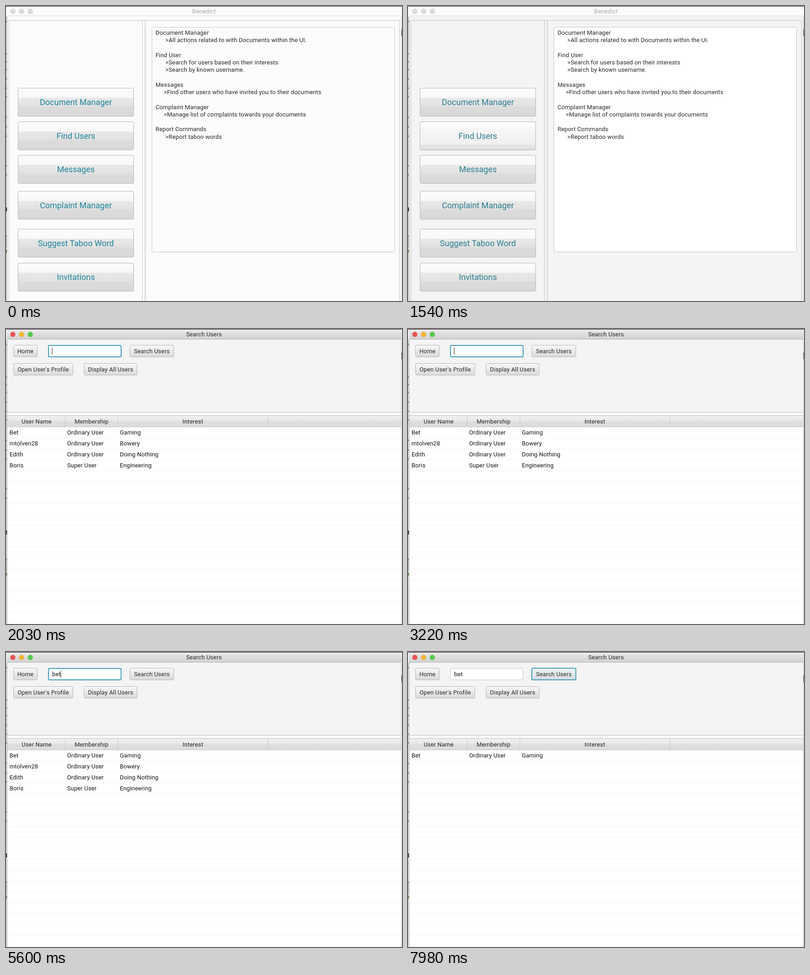
These frames come from a looping animation (867 by 646 pixels, 8 s). An HTML page:

```html
<!DOCTYPE html>
<html lang="en">
<head>
<meta charset="utf-8">
<title>User search</title>
<style>
  html, body { margin: 0; width: 100%; height: 100%; overflow: hidden; background: #fbfbfb; }
  svg { display: block; width: 867px; height: 646px; }
  text { font: 13px Roboto, Inter, sans-serif; letter-spacing: .16px; fill: #262626; white-space: pre; }
  .mid { text-anchor: middle; }
  .big { font-size: 18px; letter-spacing: 0; fill: #1f849c; animation: label 8s linear infinite; }
  .dim { fill: #a9a9a9; }
  .cell { fill: #141414; }
  .line { fill: none; stroke: #c3c3c3; }
  .light { stroke: #000; stroke-opacity: .1; }
  .pane { fill: #fbfbfb; animation: pane 8s linear infinite; }
  .area { fill: #fcfcfc; stroke: #c6c6c6; animation: area 8s linear infinite; }
  .btn { stroke: #b4b4b4; }
  .field { fill: #fff; stroke: #c3c3c3; }
  .focus { stroke: #3f9dba; stroke-width: 2; }

  .hover, #search, .found, #caret, .key, .sel, .blur { animation: 8s step-end infinite; }
  .hover { animation-name: hover; }
  #search { animation-name: search; }
  .found { animation-name: found; }
  .blur { animation-name: blur; }
  .sel { animation-name: sel; }
  #caret { animation-name: blink, move; }
  .k0 { animation-name: k0; }
  .k1 { animation-name: k1; }
  .k2 { animation-name: k2; }

  @keyframes pane { 0%, 11.4% { fill: #fbfbfb; } 18%, 100% { fill: #f4f4f4; } }
  @keyframes area { 0%, 11.4% { fill: #fcfcfc; } 18%, 100% { fill: #fff; } }
  @keyframes label { 0%, 11.4% { fill: #1f849c; } 18%, 100% { fill: #2d7d8f; } }
  @keyframes hover { 0% { opacity: 0; } 14.8%, 100% { opacity: 1; } }
  @keyframes search { 0% { opacity: 0; } 24.4%, 100% { opacity: 1; } }
  @keyframes found { 0% { opacity: 1; } 87.4%, 100% { opacity: 0; } }
  @keyframes blur { 0% { opacity: 1; } 84.8%, 100% { opacity: 0; } }
  @keyframes sel { 0% { opacity: 0; } 84.8%, 100% { opacity: 1; } }
  @keyframes blink {
    0%, 38.4%, 52.4%, 78.7% { opacity: 1; }
    31.4%, 45.4%, 71.7%, 84.8%, 100% { opacity: 0; }
  }
  @keyframes move {
    0% { transform: none; }
    58.6% { transform: translateX(7.4px); }
    61.2% { transform: translateX(14.5px); }
    64.7%, 100% { transform: translateX(18.9px); }
  }
  @keyframes k0 { 0% { fill-opacity: 0; } 58.6%, 100% { fill-opacity: 1; } }
  @keyframes k1 { 0% { fill-opacity: 0; } 61.2%, 100% { fill-opacity: 1; } }
  @keyframes k2 { 0% { fill-opacity: 0; } 64.7%, 100% { fill-opacity: 1; } }
</style>
</head>
<body>
<svg viewBox="0 0 867 646">
  <defs>
    <linearGradient id="menuFill" x2="0" y2="1">
      <stop offset="0" stop-color="#fcfcfc"/><stop offset=".34" stop-color="#f8f8f8"/>
      <stop offset=".35" stop-color="#e8e8e8"/><stop offset=".64" stop-color="#e2e2e2"/>
      <stop offset=".65" stop-color="#dcdcdc"/><stop offset="1" stop-color="#d8d8d8"/>
    </linearGradient>
    <linearGradient id="hoverFill" x2="0" y2="1">
      <stop offset="0" stop-color="#fff"/><stop offset=".18" stop-color="#fdfdfd"/>
      <stop offset=".2" stop-color="#f7f7f7"/><stop offset=".8" stop-color="#f0f0f0"/>
      <stop offset=".82" stop-color="#e4e4e4"/><stop offset="1" stop-color="#e1e1e1"/>
    </linearGradient>
    <linearGradient id="btnFill" x2="0" y2="1">
      <stop offset="0" stop-color="#f8f8f8"/><stop offset="1" stop-color="#dadada"/>
    </linearGradient>
    <linearGradient id="selFill" x2="0" y2="1">
      <stop offset="0" stop-color="#f0f5f7"/><stop offset="1" stop-color="#d3dce0"/>
    </linearGradient>
    <linearGradient id="barFill" x2="0" y2="1">
      <stop offset="0" stop-color="#ebebeb"/><stop offset="1" stop-color="#d2d2d2"/>
    </linearGradient>
    <linearGradient id="headFill" x2="0" y2="1">
      <stop offset="0" stop-color="#f1f1f1"/><stop offset=".45" stop-color="#e8e8e8"/>
      <stop offset=".5" stop-color="#dfdfdf"/><stop offset="1" stop-color="#dcdcdc"/>
    </linearGradient>
  </defs>
  <g id="home"></g>
  <g id="search"></g>
  <g id="edges"></g>
</svg>
<script>
const home = document.getElementById('home');
const search = document.getElementById('search');
const edges = document.getElementById('edges');

function add(parent, tag, attrs, content = '') {
  const el = document.createElementNS('http://www.w3.org/2000/svg', tag);
  for (const name in attrs) el.setAttribute(name, attrs[name]);
  el.textContent = content;
  return parent.appendChild(el);
}
const text = (g, x, y, str, cls = '') => add(g, 'text', { x, y, class: cls }, str);
const box = (g, x, y, width, height, attrs) => add(g, 'rect', { x, y, width, height, ...attrs });
const line = (g, d, stroke = '#c3c3c3') => add(g, 'path', { d, class: 'line', style: `stroke:${stroke}` });
const lights = (g, colors) => colors.forEach((fill, i) =>
  add(g, 'circle', { cx: 15 + 19.1 * i, cy: 11.8, r: 5.5, fill, class: 'light' }));

// Main menu
box(home, 0, 0, 867, 646, { class: 'pane' });
box(home, 2, 1, 864, 20, { fill: '#fbfbfb' });
line(home, 'M2 21.5H866', '#d8d8d8');
lights(home, ['#dcdcdc', '#dcdcdc', '#dcdcdc']);
text(home, 433.5, 16, 'Benedict', 'mid dim');
line(home, 'M6.5 646V31.5H861.5V646');
line(home, 'M298.5 32V646M305.5 32V646');
line(home, 'M303.5 32V646', '#dedede');
box(home, 319.5, 46.5, 531, 492, { rx: 2, class: 'area' });

[
  [0, 0, 'Document Manager'],
  [1, 21.5, '>All actions related to with Documents within the UI.'],
  [3, 0, 'Find User'],
  [4, 21.5, '>Search for users based on their interests'],
  [5, 21.5, '>Search by known username.'],
  [7, 0, 'Messages'],
  [8, 18, '>Find other users who have invited you to their documents'],
  [10, 0, 'Complaint Manager'],
  [11, 18, '>Manage list of complaints towards your documents'],
  [13, 0, 'Report Commands'],
  [14, 21.5, '>Report taboo words']
].forEach(([row, indent, str]) => text(home, 327.5 + indent, 63 + 16.25 * row, str));

[
  [180, 'Document Manager'], [253.5, 'Find Users'], [327, 'Messages'],
  [405.5, 'Complaint Manager'], [488.5, 'Suggest Taboo Word'], [563, 'Invitations']
].forEach(([y, str]) => {
  box(home, 26.5, y, 253, 61.5, { rx: 2.5, fill: 'url(#menuFill)', class: 'btn' });
  if (str === 'Find Users')
    box(home, 26.5, y, 253, 61.5, { rx: 2.5, fill: 'url(#hoverFill)', class: 'btn hover' });
  text(home, 153, y + 37.4, str, 'mid big');
});

// Search window
box(search, 0, 0, 867, 646, { fill: '#f4f4f4' });
box(search, 2, 1, 864, 21, { fill: 'url(#barFill)' });
line(search, 'M2 22.5H866', '#b4b4b4');
lights(search, ['#ee5351', '#f5b731', '#52cb4b']);
text(search, 433.5, 16, 'Search Users', 'mid');

function button(x, y, w, str) {
  box(search, x, y, w, 25.5, { rx: 2.5, fill: 'url(#btnFill)', class: 'btn' });
  if (str === 'Search Users')
    box(search, x, y, w, 25.5, { rx: 2.5, fill: 'url(#selFill)', class: 'focus sel' });
  text(search, x + w / 2, y + 17.2, str, 'mid');
}
button(16.5, 35.5, 52, 'Home');
button(271, 35.5, 96.5, 'Search Users');
button(16.5, 75.5, 130, "Open User's Profile");
button(171, 75.5, 116, 'Display All Users');

box(search, 93, 36, 159, 25, { rx: 2.5, class: 'field' });
box(search, 93, 36, 159, 25, { rx: 2.5, class: 'field focus blur' });
const typed = text(search, 101, 52.7, '', 'cell');
[...'bet'].forEach((c, i) => add(typed, 'tspan', { class: 'key k' + i }, c));
box(search, 100.5, 40.5, 1, 15.5, { id: 'caret', fill: '#222' });

// Table
box(search, 3, 182, 862, 8, { fill: '#f9f9f9' });
line(search, 'M3 182.5H865M3 189.5H865', '#bababa');
box(search, 3, 190, 862, 24, { fill: 'url(#headFill)' });
box(search, 3, 214, 862, 432, { fill: '#fff' });
line(search, 'M3 214.5H865M129.5 190V214M245 190V214M573.5 190V214', '#c6c6c6');
text(search, 67, 207.4, 'User Name', 'mid');
text(search, 187.3, 207.4, 'Membership', 'mid');
text(search, 409.2, 207.4, 'Interest', 'mid');
for (let i = 0; i < 18; i++)
  line(search, `M4 ${Math.floor(238.5 + 23.9 * i) + .5}H864`, '#f3f3f3');

[
  ['Bet', 'Ordinary User', 'Gaming'],
  ['mtolven28', 'Ordinary User', 'Bowery'],
  ['Edith', 'Ordinary User', 'Doing Nothing'],
  ['Boris', 'Super User', 'Engineering']
].forEach((row, i) => row.forEach((str, col) =>
  text(search, [7.7, 133.7, 249.2][col], 231.4 + 23.9 * i, str, i ? 'cell found' : 'cell')));

// Slivers of the desktop around the window
box(edges, 0, 0, 867, 1, { fill: '#2c1420' });
box(edges, 0, 23, 2, 623, { fill: '#d8d8d8' });
line(edges, 'M2.5 23V646', '#bcbcbc');
line(edges, 'M865.5 23V646', '#c8c8c8');
box(edges, 0, 506, 2, 24, { fill: '#bdbdbd' });
box(edges, 866, 51, 1, 15, { fill: '#333' });
[34, 105, 122, 139, 160, 180, 199, 244, 265, 285, 350, 370, 504].forEach(y =>
  box(edges, 0, y - 1.5, 1.5, 3, { fill: '#666' }));
box(edges, 0, 441, 2, 9, { fill: '#333' });
box(edges, 0, 534, 2, 6, { fill: '#5a8f4c' });
</script>
</body>
</html>
```
